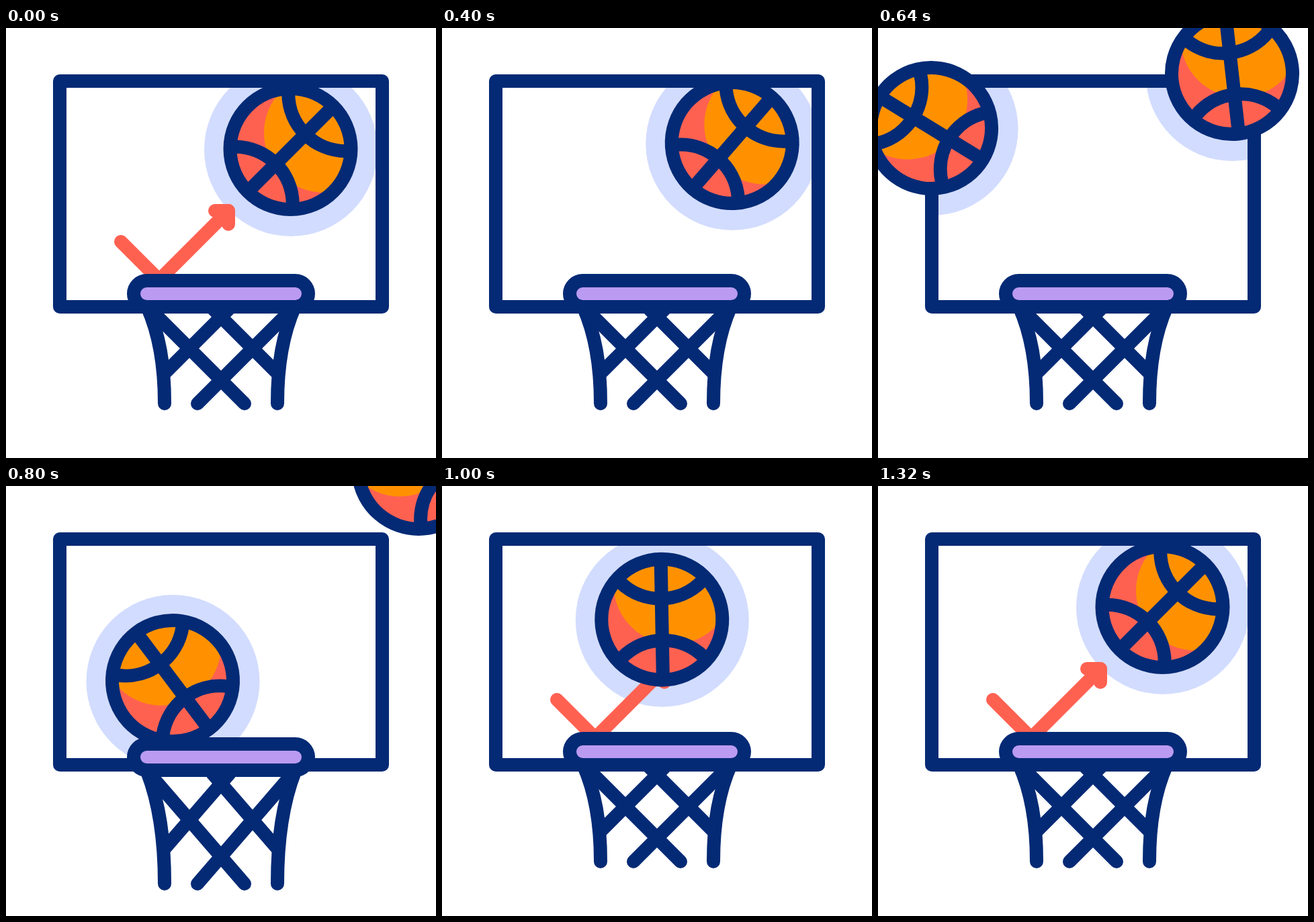
Write an HTML page with a canvas that moves like this. It is 640x640 px and loops after 1.48 s.

```html
<!DOCTYPE html>
<html lang="en">
<head>
<meta charset="utf-8">
<title>Basketball rebound</title>
<style>
  html, body { margin: 0; height: 100%; overflow: hidden; background: #fff; }
  canvas { display: block; width: 100vw; height: 100vh; }
</style>
</head>
<body>
<canvas id="stage" width="640" height="640"></canvas>
<script>
const ctx = document.getElementById('stage').getContext('2d');
const NAVY = '#042a75', HALO = '#d2dcfe', ORANGE = '#ff9100', RED = '#ff6151', PURPLE = '#ba9bf1';
const LOOP = 1480, STEP = 40, TAU = Math.PI * 2;
const REST = { x: 423.5, y: 180, angle: 45 };
const RIM_HIT = { x: 248, y: 290 };

const progress = (t, from, to) => Math.min(1, Math.max(0, (t - from) / (to - from)));
const smooth = u => u * u * (3 - 2 * u);
const mix = (a, b, u) => a + (b - a) * u;

function cubic(a, b, c, d, p) {
  const q = 1 - p;
  return a * q * q * q + 3 * b * q * q * p + 3 * c * q * p * p + d * p * p * p;
}

function ease(x1, y1, x2, y2, u) {
  let lo = 0, hi = 1;
  for (let i = 0; i < 24; i++) {
    const mid = (lo + hi) / 2;
    if (cubic(0, x1, x2, 1, mid) < u) lo = mid; else hi = mid;
  }
  return cubic(0, y1, y2, 1, hi);
}

function leavingBall(t) {
  const s = smooth(progress(t, 320, 1120));
  return { x: REST.x + 294 * s, y: REST.y - 318 * s, angle: REST.angle - 146 * s };
}

function arrivingBall(t) {
  const q = (1320 - Math.min(1320, t)) / 680;
  const angle = REST.angle - q * (50.5 + 143 * q - 90 * q * q);
  if (t < 800) {
    const s = ease(1 / 3, 0, 5 / 6, 5 / 6, progress(t, 320, 800));
    return { x: mix(-144, RIM_HIT.x, s), y: mix(-37, RIM_HIT.y, s), angle };
  }
  const s = ease(1 / 6, 1 / 6, 2 / 3, 1, progress(t, 800, 1320));
  return {
    x: cubic(RIM_HIT.x, 270.8, 380, REST.x, s),
    y: cubic(RIM_HIT.y, 287, 84, REST.y, s),
    angle
  };
}

function disc(x, y, r, color) {
  ctx.beginPath();
  ctx.arc(x, y, r, 0, TAU);
  ctx.fillStyle = color;
  ctx.fill();
}

function ring(x, y, r) {
  ctx.beginPath();
  ctx.arc(x, y, r, 0, TAU);
  ctx.stroke();
}

function polyline(...points) {
  ctx.beginPath();
  points.forEach(([x, y]) => ctx.lineTo(x, y));
  ctx.stroke();
}

function drawHalos(balls) {
  ctx.save();
  ctx.beginPath();
  ctx.rect(80, 79, 480, 336);
  ctx.clip();
  balls.forEach(b => disc(b.x + 0.5, b.y + 1, 129, HALO));
  ctx.restore();
}

function drawBall({ x, y, angle }) {
  ctx.save();
  ctx.translate(x, y);
  ctx.rotate(angle * Math.PI / 180);
  ctx.strokeStyle = NAVY;
  ctx.save();
  ctx.beginPath();
  ctx.arc(0, 0, 90, 0, TAU);
  ctx.clip();
  disc(0, 0, 90, RED);
  disc(18, -52, 89, ORANGE);
  ring(0, -117, 86);
  ring(0, 117, 86);
  polyline([0, -90], [0, 90]);
  ctx.restore();
  ring(0, 0, 90);
  ctx.restore();
}

function drawArrow(t) {
  const gone = t < 800 ? smooth(progress(t, 80, 320)) : 0;
  if (gone === 1) return;
  const length = 160 * Math.SQRT2;
  const arm = 20 * Math.min(1, 3 * (1 - gone));
  ctx.strokeStyle = RED;
  ctx.setLineDash([length + 1, length + 1]);
  ctx.lineDashOffset = -gone * length;
  polyline([171, 318], [228, 375], [331, 272]);
  ctx.setLineDash([]);
  polyline([331 - arm, 272], [331, 272], [331, 272 + arm]);
}

function drawHoop(t) {
  const pull = smooth(progress(t, 720, 800)) * (1 - smooth(progress(t, 800, 960)));
  const sag = y => y + pull * (8 + (y - 400) * 0.157);
  ctx.strokeStyle = NAVY;
  for (const side of [-1, 1]) {
    const at = (x, y) => [320 + side * x, sag(y)];
    ctx.beginPath();
    ctx.moveTo(...at(110, 415));
    ctx.bezierCurveTo(...at(92, 455), ...at(84, 500), ...at(84, 559));
    ctx.stroke();
    polyline(at(101, 423), at(-35, 559));
    polyline(at(-13, 417), at(82, 512));
  }
  ctx.beginPath();
  ctx.roundRect(190, 376 + 8 * pull, 260, 39, 19.5);
  ctx.fillStyle = PURPLE;
  ctx.fill();
  ctx.stroke();
}

function draw(t) {
  ctx.clearRect(0, 0, 640, 640);
  ctx.lineWidth = 20;
  ctx.lineCap = ctx.lineJoin = 'round';
  const balls = [leavingBall(t), arrivingBall(t)];
  drawHalos(balls);
  ctx.strokeStyle = NAVY;
  ctx.strokeRect(80, 79, 480, 336);
  drawArrow(t);
  balls.forEach(drawBall);
  drawHoop(t);
}

const start = performance.now();
function tick() {
  const t = (performance.now() - start) % LOOP;
  draw(Math.floor(t / STEP) * STEP);
  requestAnimationFrame(tick);
}
tick();
</script>
</body>
</html>
```
